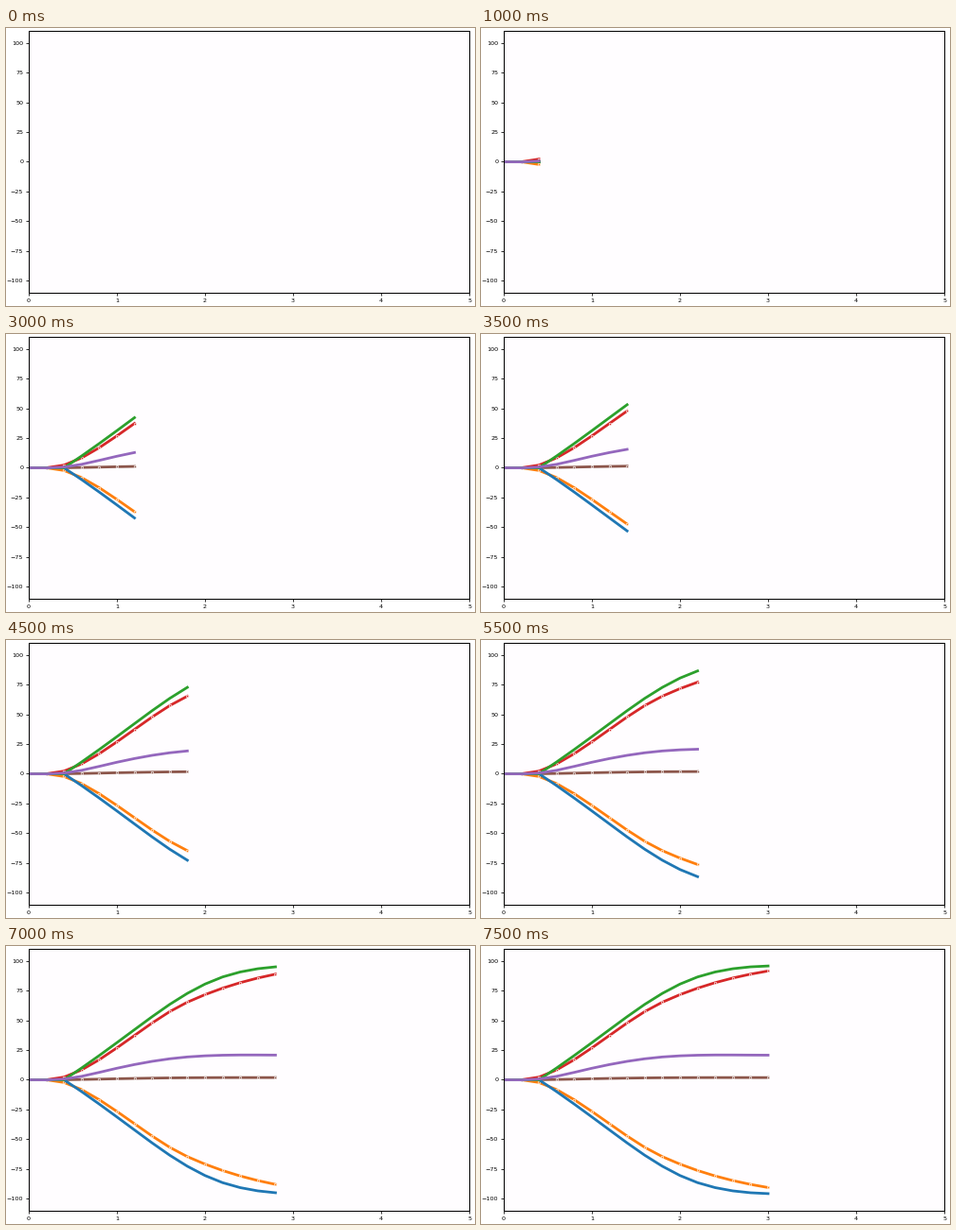
Recreate the animation shown at these times as a matplotlib script. Size 495 by 294 pixels, loop 8 s.

```python
import numpy as np
import matplotlib.pyplot as plt
from matplotlib.animation import FuncAnimation

W, H, DPI = 495, 294, 72
FRAMES, INTERVAL = 16, 500
STEP = 0.2

plt.rcParams["font.family"] = "DejaVu Sans"
plt.rcParams["font.size"] = 6.4


def hermite(x, *knots):
    """Smooth curve through knots of (x, y, slope), flat before the first."""
    kx, ky, slope = np.transpose(knots)
    x = np.clip(x, kx[0], kx[-1])
    i = np.clip(np.searchsorted(kx, x) - 1, 0, len(kx) - 2)
    h = kx[i + 1] - kx[i]
    t = (x - kx[i]) / h
    ease = t * t * (3 - 2 * t)
    return (ky[i] * (1 - ease) + ky[i + 1] * ease
            + h * t * (1 - t) * (slope[i] * (1 - t) - slope[i + 1] * t))


x = STEP * np.arange(FRAMES)
outer = hermite(x, (0.4, 0, 48), (1.4, 53, 54), (2.2, 86.4, 25), (3, 95.6, 2))
inner = hermite(x, (0.2, 0, 0), (1, 26.8, 51), (1.8, 65.2, 34), (3, 91.4, 12))
middle = hermite(x, (0, 0, 0), (0.4, 0.6, 8), (1, 9.7, 16.5),
                 (1.8, 19.2, 6), (3, 20.7, 0))
flat = 0.09 * middle

# (values, colour, has markers), back to front
SERIES = [
    (-0.99 * inner, "C1", True),
    (inner, "C3", True),
    (flat, "C5", True),
    (-outer, "C0", False),
    (outer, "C2", False),
    (middle, "C4", False),
]

fig = plt.figure(figsize=(W / DPI, H / DPI), dpi=DPI, facecolor="white")
ax = fig.add_axes([24 / W, 1 - 280 / H, 465 / W, 277 / H],
                  facecolor="#fffdff")
ax.set(xlim=(0, 5), ylim=(-110, 110), xticks=range(6),
       yticks=range(-100, 101, 25))
ax.tick_params(length=3, width=0.8, pad=2.8)
ax.spines[:].set_linewidth(1)


def make_line(color, marked):
    style = dict(marker=".", ms=5, mec="white", mew=0.6) if marked else {}
    return ax.plot([], [], color=color, lw=2.8, **style)[0]


lines = [make_line(color, marked) for _, color, marked in SERIES]


def update(i):
    n = i + 1 if i else 0
    for line, (y, _, _) in zip(lines, SERIES):
        line.set_data(x[:n], y[:n])
    return lines


anim = FuncAnimation(fig, update, frames=FRAMES, interval=INTERVAL,
                     init_func=lambda: update(0), repeat=True, repeat_delay=0)
plt.show()
```
